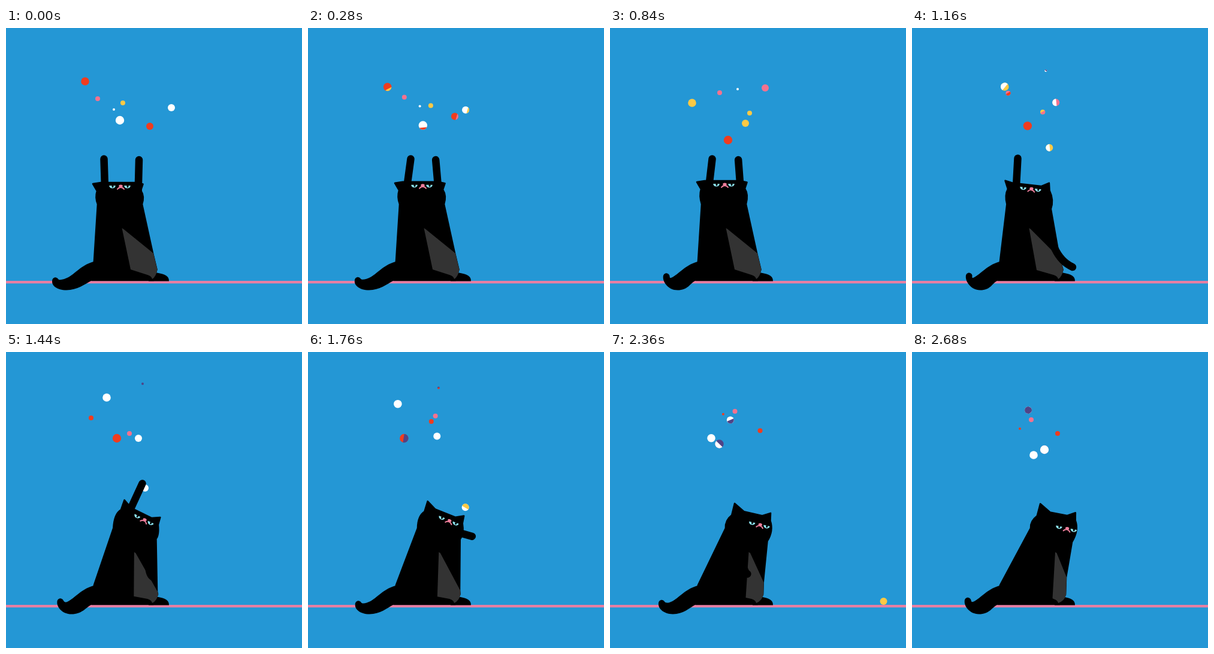
These frames come from a looping animation (494 by 494 pixels, 2.72 s). An HTML page with a canvas:

```html
<!DOCTYPE html>
<html lang="en">
<head>
<meta charset="utf-8">
<title>Juggling cat</title>
<style>
html, body { margin: 0; width: 100%; height: 100%; overflow: hidden; background: #2497d5; }
canvas { display: block; }
</style>
</head>
<body>
<canvas id="stage" width="494" height="494"></canvas>
<script>
const ctx = document.getElementById('stage').getContext('2d');
const LOOP = 2720, STEP = 40;
const DROP_TIME = 1440;
const COLORS = { w: '#ffffff', r: '#f03c1e', y: '#fdc944', k: '#f4728f', p: '#4f4488' };

const clamp01 = v => Math.max(0, Math.min(1, v));

function segment(times, t) {
  let i = 0;
  while (i < times.length - 2 && t >= times[i + 1]) i++;
  return [i, clamp01((t - times[i]) / (times[i + 1] - times[i]))];
}

// Smooth curve through key values that never overshoots them
function track(times, values, t) {
  const [i, u] = segment(times, t);
  const rate = k => (values[k + 1] - values[k]) / (times[k + 1] - times[k]);
  const slope = k => {
    if (k === 0 || k === times.length - 1) return 0;
    const a = rate(k - 1), b = rate(k);
    return a * b > 0 ? 2 * a * b / (a + b) : 0;
  };
  const span = times[i + 1] - times[i], blend = u * u * (3 - 2 * u);
  return values[i] + (values[i + 1] - values[i]) * blend +
    span * u * (1 - u) * (slope(i) * (1 - u) - slope(i + 1) * u);
}

// --- Balls: each rolls from colour to colour along a few waypoints ---

const TOSSES = [0, 840, 1440, 2040, 2680];
const balls = [];
function addBall(radius, colors, xs, ys) {
  balls.push({ radius, colors, xs, ys });
}
addBall(6.8, 'rywww', [132, 137, 168, 135, 203], [89, 125, 76, 105, 172]);
addBall(7.2, 'wrrpw', [190, 197, 185, 144, 221], [154, 187, 144, 144, 163]);
addBall(4, 'kkrrr', [153, 183, 142, 258, 243], [118, 108, 110, 123, 136]);
addBall(2, 'wwprr', [180, 213, 228, 204, 180], [136, 102, 53, 72, 128]);
addBall(4, 'yykkk', [195, 233, 206, 218, 199], [125, 142, 136, 85, 113]);
addBall(6, 'rkwwp', [240, 259, 221, 211, 194], [164, 100, 144, 134, 97]);
const missed = { radius: 6, colors: 'wywyy', xs: [276, 226, 232], ys: [133, 159, 227] };

function drawBall(x, y, { radius, colors }, t) {
  const [i, u] = segment(TOSSES, t);
  const half = Math.PI * u, turn = i + radius + t / 500;
  ctx.fillStyle = COLORS[colors[i]];
  ctx.beginPath();
  ctx.arc(x, y, radius, 0, 7);
  ctx.fill();
  if (colors[i] === colors[i + 1]) return;
  ctx.fillStyle = COLORS[colors[i + 1]];
  ctx.beginPath();
  ctx.arc(x, y, radius, turn - half, turn + half);
  ctx.fill();
}

function drawBalls(t) {
  const times = TOSSES;
  for (const ball of balls) {
    drawBall(track(times, ball.xs, t), track(times, ball.ys, t), ball, t);
  }
  const fall = (t - DROP_TIME) / 600;
  if (fall < 0) {
    const early = times.slice(0, 3);
    drawBall(track(early, missed.xs, t), track(early, missed.ys, t), missed, t);
  } else {
    const x = 232 + 10 * fall + 89 * fall * fall;
    drawBall(x, Math.min(416, 227 + 113 * fall * fall), missed, t);
  }
}

// --- Cat: the whole pose follows from its lean, tilt and hands ---

const POSES = [0, 520, 840, 1160, 1440, 2040, 2680];
const LEAN = [0, 0, 0, .12, .585, .726, 1];
const TILT = [0, 0, 0, 7, 27, 17, 12];
const HEAD_Y = [282, 279.5, 279, 283, 288, 289, 290];

const HANDS = {
  left: {
    times: [0, 840, 1160, 1440, 1740, 2040, 2680],
    xs: [163.5, 163.5, 176.5, 227.5, 274, 254, 215],
    ys: [218.5, 218.5, 217.5, 219.5, 302, 381, 360]
  },
  right: {
    times: [0, 840, 1000, 1160, 1440, 2680],
    xs: [222, 222, 287, 268, 246, 251],
    ys: [220, 220, 300, 399, 376, 330]
  }
};

function poseAt(t) {
  const lean = track(POSES, LEAN, t);
  const arch = Math.sqrt(lean);
  return {
    lean,
    perk: clamp01(lean * 8),
    tilt: track(POSES, TILT, t) * Math.PI / 180,
    head: [190 + 48 * lean, track(POSES, HEAD_Y, t)],
    leftNeck: [153 + 45 * lean, 294],
    rightNeck: [227 + 40 * lean, 294 + 23 * arch],
    side: [246 + 12 * lean, 376 + 25 * Math.sin(Math.PI * lean)],
    hip: [252.5 + 4.5 * lean * lean, 403 + 2 * lean]
  };
}

function drawTail(t) {
  const x = 88.5 + 6.8 * Math.cos(2 * Math.PI * (t - 1050) / 1900);
  const y = 421 - (x - 82) * .6;
  ctx.beginPath();
  ctx.moveTo(150, 389);
  ctx.bezierCurveTo(128, 393, 113, 412, 104, 416);
  ctx.bezierCurveTo(98, 419, x + 7, y + 1, x + 5, y - 2);
  ctx.bezierCurveTo(x + 2, y - 7, x - 5, y - 5, x - 5, y + 1);
  ctx.bezierCurveTo(x - 6, y + 9, x + 3, 437.5, x + 19, 437.5);
  ctx.bezierCurveTo(x + 36, 437.5, 133, 427, 142, 422);
  ctx.lineTo(150, 422);
  ctx.fill();
}

function drawBody({ lean, perk, tilt, head, leftNeck, rightNeck, side, hip }) {
  const cos = Math.cos(tilt), sin = Math.sin(tilt);
  const onHead = (x, y) => [head[0] + x * cos - y * sin, head[1] + x * sin + y * cos];
  ctx.beginPath();
  ctx.moveTo(143, 421);
  ctx.lineTo(147, 389);
  ctx.lineTo(...leftNeck);
  ctx.quadraticCurveTo(...onHead(-41.5, 1), ...onHead(-38 + 6 * lean, -10));
  ctx.lineTo(...onHead(-45 + 14 * lean, -22 - 9 * lean));
  ctx.lineTo(...onHead(-32 + 20 * lean, -24 + 3.5 * perk));
  ctx.lineTo(...onHead(27 - 10 * perk, -24 + 3 * perk));
  ctx.lineTo(...onHead(38.5 - 9 * perk, -21.5 - 7 * perk));
  ctx.lineTo(...onHead(35 - 3 * perk, -11 - 5 * perk));
  ctx.quadraticCurveTo(...onHead(41.5, -1), ...rightNeck);
  ctx.lineTo(side[0] - 1, side[1]);
  ctx.lineTo(hip[0] - 1, hip[1]);
  ctx.lineTo(246, 421);
  ctx.closePath();
  ctx.fill();
  ctx.lineWidth = 2.6;
  ctx.stroke();

  // foot
  ctx.beginPath();
  ctx.moveTo(238, 408);
  ctx.lineTo(252, 408.5);
  ctx.bezierCurveTo(266, 411, 272, 414, 272, 422.5);
  ctx.lineTo(238, 422.5);
  ctx.fill();
}

function drawBelly({ lean, side, hip }) {
  const top = 193.5 + 45.5 * lean ** 1.5;
  ctx.fillStyle = '#333333';
  ctx.beginPath();
  ctx.moveTo(top, 334);
  ctx.lineTo(top + 2.5, 335.5);
  ctx.lineTo(...side);
  ctx.lineTo(...hip);
  ctx.quadraticCurveTo(hip[0] - 2, 415, 244, 419);
  ctx.quadraticCurveTo(243, 414, 236, 412);
  ctx.lineTo(208 + 26.5 * lean ** 3, 403 + 8 * lean);
  ctx.closePath();
  ctx.fill();
}

function drawArm(sx, sy, hx, hy, bendX, bendY) {
  const lowered = clamp01((hy - 300) / 100);
  ctx.lineWidth = 12.5;
  ctx.beginPath();
  ctx.moveTo(sx, sy);
  ctx.quadraticCurveTo((sx + hx) / 2 + bendX * lowered, (sy + hy) / 2 + bendY * lowered, hx, hy);
  ctx.stroke();
}

function drawArms({ lean, head, rightNeck }, t) {
  const [left, right] = [HANDS.left, HANDS.right].map(({ times, xs, ys }) =>
    [track(times, xs, t), track(times, ys, t)]);
  const sway = 4.5 * (1 - Math.cos(2 * Math.PI * t / 520)) * clamp01((1160 - t) / 320);
  const shoulderX = head[0] - 25 + 13 * clamp01(lean * 2);
  ctx.strokeStyle = '#000';
  drawArm(shoulderX, Math.max(266, left[1] - 19), left[0] + sway * .9, left[1], 0, 10);
  drawArm(rightNeck[0] - 7, rightNeck[1] + 4, right[0] - sway, right[1], -17, 30);
}

function drawEye(x) {
  ctx.fillStyle = '#8ee6f2';
  ctx.beginPath();
  ctx.ellipse(x, -1, 5.3, 4.6, 0, 0, Math.PI);
  ctx.fill();
  ctx.fillStyle = '#000';
  ctx.beginPath();
  ctx.ellipse(x + .5, 0, 1.5, 2.4, 0, 0, 7);
  ctx.fill();
}

function drawFace({ lean, perk, tilt, head }) {
  ctx.save();
  ctx.translate(...head);
  ctx.rotate(tilt);
  ctx.translate(1.5 + 20 * lean * lean, -18 + 3 * perk + 15 * lean ** 4);
  drawEye(-14);
  drawEye(11);
  ctx.fillStyle = ctx.strokeStyle = '#f07f9c';
  ctx.beginPath();
  ctx.ellipse(0, -.2, 3.2, 2.2, 0, 0, 7);
  ctx.fill();
  ctx.lineWidth = 1.9;
  ctx.beginPath();
  ctx.moveTo(-5.5, 5);
  ctx.quadraticCurveTo(-3.5, 2, 0, 2);
  ctx.quadraticCurveTo(3.5, 2, 5.5, 5);
  ctx.stroke();
  ctx.restore();
}

function drawCat(t) {
  const pose = poseAt(t);
  ctx.fillStyle = ctx.strokeStyle = '#000';
  drawTail(t);
  drawBody(pose);
  drawBelly(pose);
  drawArms(pose, t);
  drawFace(pose);
}

function draw(t) {
  ctx.fillStyle = '#2497d5';
  ctx.fillRect(0, 0, 494, 494);
  ctx.fillStyle = '#e87ea3';
  ctx.fillRect(0, 422, 494, 4.3);
  ctx.lineCap = ctx.lineJoin = 'round';
  drawBalls(t);
  drawCat(t);
}

const start = performance.now();
function tick() {
  const t = (performance.now() - start) % LOOP;
  draw(Math.floor(t / STEP) * STEP);
  requestAnimationFrame(tick);
}
tick();
</script>
</body>
</html>
```
